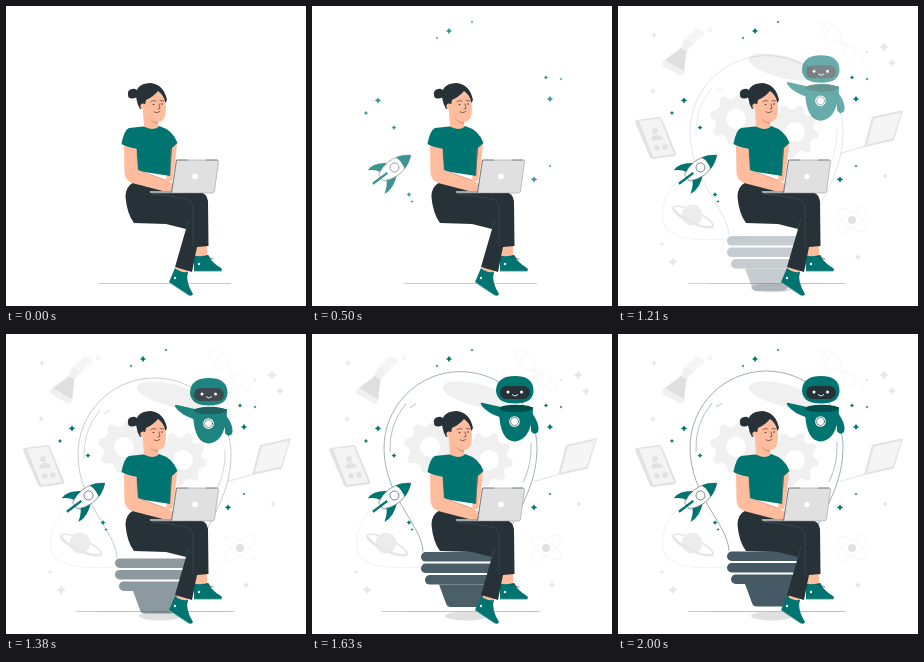
Write an HTML page that moves like this. It is 300 px wide and 300 px high and loops after 2.04 s.

```html
<!DOCTYPE html>
<html lang="en">
<head>
<meta charset="utf-8">
<style>
html, body { margin: 0; width: 100%; height: 100%; overflow: hidden; background: #fff; }
svg { display: block; width: 100vw; height: 100vh; }
.teal { fill: #007470; }
.dark { fill: #263238; }
.skin { fill: #ffbd9d; }
.pale { fill: #f0f0f0; }
.mid { fill: #e2e2e2; }
.line { fill: none; stroke: #263238; stroke-width: .6; stroke-linecap: round; stroke-linejoin: round; }
.faint { fill: none; stroke: #f5f5f5; stroke-width: .8; }
</style>
</head>
<body>
<svg viewBox="0 0 300 300">
  <g id="backdrop" opacity="0">
    <path d="M60 174C44 190 40 214 50 224C66 238 100 233 132 232M60 174Q72 170 84 184" fill="none" stroke="#ededed" stroke-width=".7"/>
    <ellipse class="pale" cx="165" cy="61" rx="35" ry="11" transform="rotate(14 165 61)"/>
    <path id="gears" class="pale" fill-rule="evenodd"/>
    <path d="M68 36Q68 28 74 28Q75 21 82 23Q88 25 85 30Q80 30 78 36Q75 40 72 39Z" fill="#f5f5f5"/>
    <circle cx="92" cy="24" r="2.300" fill="#f5f5f5"/>
    <g transform="translate(62 50) rotate(30)">
      <path class="pale" d="M-5-17H5V-14H4V-5L12 12Q13 17 8 17H-8Q-13 17-12 12L-4-5V-14H-5Z"/>
      <path d="M-4-7H4V-5L11 11H-11L-4-5Z" fill="#dfdfdf"/>
    </g>
    <path class="mid" d="M18 114L41 111Q43 111 44 113L58 147Q59 149 57 150L35 153Q33 153 32 151L17 116Z"/>
    <path d="M21 115L42 112.500L56 148L35 151Z" fill="#f4f4f4"/>
    <path class="mid" d="M33 132Q39 126 44 131L45 133L34 135Z"/>
    <circle class="mid" cx="37" cy="125" r="3"/>
    <circle class="mid" cx="39" cy="142" r="2.800"/>
    <circle class="mid" cx="47" cy="141" r="2.800"/>
    <ellipse cx="75" cy="211" rx="22" ry="6" transform="rotate(25 75 211)" fill="none" stroke="#e4e4e4" stroke-width="1.600"/>
    <circle cx="74" cy="209" r="10.500" fill="#ececec"/>
    <path d="M55 202C60 211 85 224 95 220" fill="none" stroke="#e4e4e4" stroke-width="1.600"/>
    <path class="mid" d="M254 111L285 104L276 134L246 141Z"/>
    <path d="M256 112.500L283 106.500L275 132.500L249 138.500Z" fill="#f5f5f5"/>
    <path d="M222 147.500L246 140.500L276 134" fill="none" stroke="#e2e2e2"/>
    <path class="faint" d="M202 16Q222 14 223 34T246 57M202 16Q202 35 222 37T246 57M207 16L204 25M214 18L207 31M229 39L225 48M239 43L233 54"/>
    <ellipse class="faint" cx="234" cy="214" rx="18" ry="7" transform="rotate(35 234 214)"/>
    <ellipse class="faint" cx="234" cy="214" rx="18" ry="7" transform="rotate(-40 234 214)"/>
    <circle class="mid" cx="234" cy="214" r="4"/>
    <path id="paleStars" fill="#e8e8e8"/>
    <ellipse cx="154" cy="282" rx="21" ry="4.500" fill="#e0e0e0"/>
  </g>

  <path d="M92 277.500H225" stroke="#bdbdbd" stroke-width=".8"/>
  <path id="floor" d="M70 277.500H228" stroke="#bdbdbd" stroke-width=".8" opacity="0"/>

  <g id="bulb" opacity="0">
    <path d="M111 217C110 190 72 162 72 113.500A76.500 76.500 0 0 1 225 113.500C225 162 192 192 191 217" fill="none" stroke="#455a64" stroke-width=".5"/>
    <path d="M78 118A70.500 70.500 0 0 1 94 69M98 73L104 69M219 108Q220 130 211 148" fill="none" stroke="#6a7a82" stroke-width=".5"/>
    <g fill="#455a64">
      <rect x="109" y="217.500" width="84" height="9.500" rx="4.700"/>
      <rect x="109" y="229" width="84" height="9.500" rx="4.700"/>
      <rect x="113" y="240.500" width="76" height="9.500" rx="4.700"/>
      <path d="M127 250H176L169 269Q168 272.500 164 272.500H139Q135 272.500 134 269Z"/>
    </g>
  </g>

  <g id="robot" opacity="0">
    <path class="teal" d="M189 73L171 69Q167 68 170 72Q175 79 190 84Z"/>
    <path class="teal" d="M219 78C224 84 228 92 226 98Q222 102 219 97Z"/>
    <path class="teal" d="M187 73C187 91 190 107 203 107.500C216 106 221 91 221 73Z"/>
    <ellipse cx="204" cy="74.500" rx="16.500" ry="3.800" fill="#004e4b"/>
    <path class="teal" d="M184 57C184 46 192 42 203 42S221.500 46 221.500 57Q221 69.500 203 69.500T184 57Z"/>
    <rect class="dark" x="188" y="52" width="30" height="13" rx="6.500"/>
    <g fill="#fff">
      <circle cx="196" cy="58" r="1.500"/>
      <circle cx="209.500" cy="58" r="1.500"/>
      <circle cx="202.500" cy="87.500" r="5.300"/>
    </g>
    <path d="M200 60.500Q203 63.500 206 60.500" fill="none" stroke="#fff" stroke-width=".9"/>
    <circle class="line" cx="202.500" cy="87.500" r="4"/>
  </g>

  <g id="launch" opacity="0">
    <path id="tealStars" class="teal"/>
    <g transform="translate(82.500 161.500) rotate(-37)">
      <path class="teal" d="M-1-6Q-13-17-23-14Q-16-10-14-5ZM-1 6Q-13 17-24 15Q-16 10-14 5Z"/>
      <path d="M20.500 0Q11-8-1-8.300Q-10-8-17-4V4Q-10 8-1 8.300Q11 8 20.500 0Z" fill="#fff" stroke="#37474f" stroke-width=".5"/>
      <path class="teal" d="M20.500 0Q14-5.500 7-7.300Q10 0 7 7.300Q14 5.500 20.500 0Z"/>
      <circle cx="0" cy="0" r="4.500" fill="#fff" stroke="#37474f" stroke-width=".6"/>
      <path class="teal" d="M-9-1.200H-27V1.200H-9Z"/>
    </g>
  </g>

  <g id="woman">
    <path class="skin" d="M190 238H201V252H190ZM173 256L184 260L181 269L170 265Z"/>
    <path class="teal" d="M188 249.500Q195 251 202 249Q206 257 215 262Q217 264 215 265H188Z"/>
    <path d="M188 265.300H215.500" stroke="#8fbdba" stroke-width=".9"/>
    <path class="line" d="M199 251Q204 248 203 252L207 253"/>
    <path class="teal" d="M169 262Q174 267 182 266Q179 275 187 288Q186 291 182 289L163 276Z"/>
    <path d="M163 276.500L183 289.500" stroke="#8fbdba" stroke-width=".8"/>
    <circle cx="169" cy="272" r="1.200" fill="#fff"/>
    <circle cx="193" cy="258" r="1.200" fill="#fff"/>
    <path class="dark" d="M128 176Q119 181 119.500 191Q121 208 128 217L160 218L180 223L169 261L186 266L191 241L202.500 240L202 195Q201 187 193 186L164 183L160 176Z"/>
    <path d="M146 188Q175 191 183 194Q188 198 187 207L187 240M180 223L183 213" fill="none" stroke="#46565e" stroke-width=".5"/>
    <path class="skin" d="M164 140L171 138L169 158L166 175H160Z"/>
    <path class="teal" d="M137 120.500L123 122Q118 124 115.500 138Q122 142 130.500 143L131.500 165Q145 167 164 170L166 142L171.500 137Q167 124 153 120Z"/>
    <path class="skin" d="M118 140L130.500 143L132 164L161 174L168 179L166 185H157L126 177Q119 174 118.500 167Z"/>
    <path d="M130.500 144L132 164L160 174.500M165 142L164 170" fill="none" stroke="#b77f68" stroke-width=".4"/>
    <path class="skin" d="M136 92Q147 82 157 85Q161 96 159.500 108Q158 116 152 116L152.500 121Q146 125 138 120.500Z"/>
    <path d="M142 111Q146 116 152 116L152 118.500Q145 117 142 111Z" fill="#ef9c7c"/>
    <path class="dark" d="M122 89Q121 84 126 83Q131 82 132 87Q132 92 127 92.500Q122 93 122 89Z"/>
    <path class="dark" d="M130 91C129 80 137 77 145 77Q158 79 161 94L159.500 97Q158 89 152 85Q147 91 140 94Q139 102 134 103Q131 98 130 91Z"/>
    <circle class="skin" cx="137" cy="100" r="2.600"/>
    <circle class="dark" cx="147.500" cy="98.500" r=".8"/>
    <circle class="dark" cx="156" cy="98" r=".8"/>
    <path class="line" d="M145 95.500Q148 93.500 150 95M154 94.500L158 95M153 98L154 102.500L152 103M148 106Q151 108 154 105.500"/>
    <path d="M144 185H167V187.300H145Q143 186.500 144 185Z" fill="#a6a6a6"/>
    <path d="M170.500 154H211Q213 154 212.500 156L208.500 185Q208 187 206 187H165.500Z" fill="#e0e0e0" stroke="#8a8a8a" stroke-width=".5"/>
    <path d="M170.500 154L165.500 187" stroke="#455a64" stroke-width=".6"/>
    <path d="M171 154H182M200 154H211" stroke="#455a64" stroke-width=".6"/>
    <circle cx="189" cy="170.500" r="2.700" fill="#fff"/>
  </g>
</svg>
<script>
const LOOP = 2040;
const el = id => document.getElementById(id);

const star = ([x, y, r]) => {
  const k = r * 0.2;
  return `M${x} ${y - r}Q${x + k} ${y - k} ${x + r} ${y}Q${x + k} ${y + k} ${x} ${y + r}` +
    `Q${x - k} ${y + k} ${x - r} ${y}Q${x - k} ${y - k} ${x} ${y - r}Z`;
};
const stars = list => list.map(star).join("");

function gear(cx, cy, r, teeth, holeX, holeY, hole) {
  const points = [];
  for (let i = 0; i < teeth * 4; i++) {
    const a = (i + 0.5) * Math.PI / (teeth * 2);
    const radius = i % 4 < 2 ? r : r * 0.8;
    points.push(`${cx + radius * Math.cos(a)} ${cy + radius * Math.sin(a)}`);
  }
  const arc = `a${hole} ${hole} 0 1 0 `;
  return `M${points.join("L")}ZM${holeX - hole} ${holeY}${arc}${hole * 2} 0${arc}${-hole * 2} 0Z`;
}

el("gears").setAttribute("d", gear(118, 113, 26, 8, 118, 113, 10) + gear(174, 125, 27, 9, 177, 126, 10));
el("tealStars").setAttribute("d", stars([
  [137, 25, 3.2], [160, 16, 1.5], [125, 32, 1.5], [66, 94.5, 3.2], [54, 107, 2.2],
  [82, 121.5, 2.5], [234, 71.5, 2.3], [249, 73, 1.5], [238, 93, 3.2], [238, 160, 1.5],
  [222, 173.5, 3.2], [97, 188.5, 2.5], [100, 195.5, 1.5]
]));
el("paleStars").setAttribute("d", stars([
  [36, 29, 3], [35, 85, 3], [55, 256, 5], [44, 238, 2.5], [266, 41, 5],
  [274, 57, 4], [267, 170, 3], [240, 251, 3.5], [249, 46, 2]
]));

const ramp = (t, from, to) => Math.min(1, Math.max(0, (t - from) / (to - from)));
const ease = u => u * u * (3 - 2 * u);
const fade = (id, opacity) => el(id).setAttribute("opacity", opacity);

function rise(id, progress) {
  fade(id, progress);
  el(id).setAttribute("transform", `translate(0 ${18 * (1 - progress)})`);
}

function draw(now) {
  const t = now % LOOP;
  fade("launch", ramp(t, 90, 630));
  fade("backdrop", ramp(t, 500, 1000));
  fade("floor", ramp(t, 1000, 1250));
  rise("robot", ease(ramp(t, 790, 1540)));
  rise("bulb", ease(ramp(t, 920, 1720)));
}

const start = performance.now();
function tick() {
  draw(performance.now() - start);
  requestAnimationFrame(tick);
}
tick();
</script>
</body>
</html>
```
